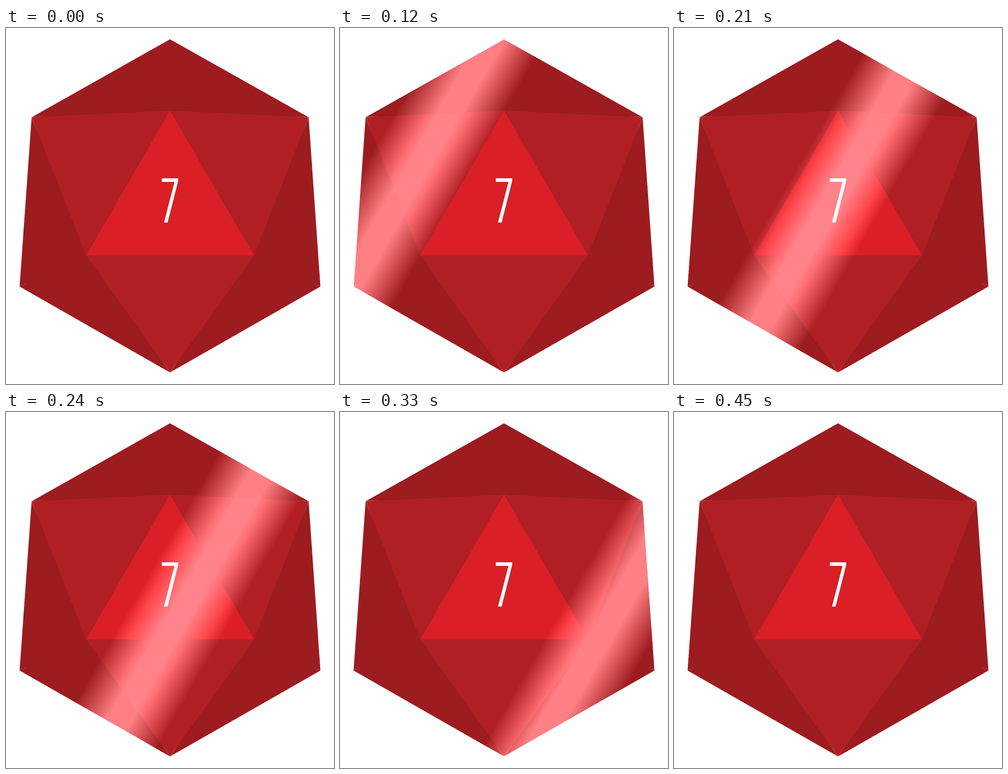
An HTML page with a canvas that plays this animation: 640 px wide and 694 px high, repeating every 4500 ms.

```html
<!DOCTYPE html>
<html lang="en">
<head>
<meta charset="utf-8">
<title>Die with a passing gleam</title>
<style>
  html, body { margin: 0; width: 100%; height: 100%; overflow: hidden; background: #fff; }
  canvas { display: block; }
</style>
</head>
<body>
<canvas id="stage" width="640" height="694" role="img" aria-label="7"></canvas>
<script>
const W = 640, H = 694, LOOP = 4500, STEP = 30;
const ctx = document.getElementById('stage').getContext('2d');

// Gleam: a slanted bar of added light, measured along its normal.
const ANGLE = Math.PI / 6, START = 44, SPEED = 1.865, REACH = 92, CORE = 20, LIGHT = 100;

const crown = [320, 22], foot = [320, 671.5];
const upperLeft = [50, 174], upperRight = [590.5, 174];
const lowerLeft = [26.5, 504], lowerRight = [613.5, 504];
const apex = [320, 161], baseLeft = [156.5, 443.5], baseRight = [484, 443.5];

function polygon(color, ...points) {
  ctx.fillStyle = color;
  ctx.beginPath();
  for (const p of points) ctx.lineTo(...p);
  ctx.fill();
}

// Hairline glint running from a corner and fading out.
function glint([x, y], dx, dy) {
  const fade = ctx.createLinearGradient(x, y, x + dx, y + dy);
  fade.addColorStop(0, 'rgba(255,225,220,.6)');
  fade.addColorStop(1, 'rgba(255,225,220,.15)');
  ctx.strokeStyle = fade;
  ctx.lineWidth = 0.6;
  ctx.beginPath();
  ctx.moveTo(x, y);
  ctx.lineTo(x + dx, y + dy);
  ctx.stroke();
}

function drawDie() {
  polygon('#9c1c20', crown, upperRight, lowerRight, foot, lowerLeft, upperLeft);
  polygon('#af1f24', upperLeft, apex, upperRight, baseRight, foot, baseLeft);
  polygon('#da1f26', apex, baseRight, baseLeft);
  for (const [side, upper, lower] of [[-1, upperLeft, lowerLeft], [1, upperRight, lowerRight]]) {
    glint(upper, -side * 25, -2);
    glint(upper, -side * 9, 24);
    glint(lower, -side * 13, -6);
    glint(foot, side * 16, -23);
  }
}

function drawGleam(center) {
  const at = s => [s * Math.cos(ANGLE), s * Math.sin(ANGLE)];
  const light = ctx.createLinearGradient(...at(center - REACH), ...at(center + REACH));
  const inset = (1 - CORE / REACH) / 2;
  const bright = `rgb(${LIGHT},${LIGHT},${LIGHT})`;
  light.addColorStop(0, '#000');
  light.addColorStop(inset, bright);
  light.addColorStop(1 - inset, bright);
  light.addColorStop(1, '#000');
  ctx.globalCompositeOperation = 'lighter';
  ctx.fillStyle = light;
  ctx.fillRect(0, 0, W, H);
  ctx.globalCompositeOperation = 'source-over';
}

function drawSeven() {
  polygon('#fff', [304, 293], [336, 293], [336, 298], [315.3, 379.3],
    [308.3, 379.3], [328.8, 300], [304, 300]);
}

function draw(elapsed) {
  const t = Math.floor(elapsed % LOOP / STEP) * STEP;
  ctx.fillStyle = '#fff';
  ctx.fillRect(0, 0, W, H);
  drawDie();
  if (t > 0 && t < 450) drawGleam(START + SPEED * t);
  drawSeven();
}

const begin = performance.now();
function tick() {
  draw(performance.now() - begin);
  requestAnimationFrame(tick);
}
tick();
</script>
</body>
</html>
```
